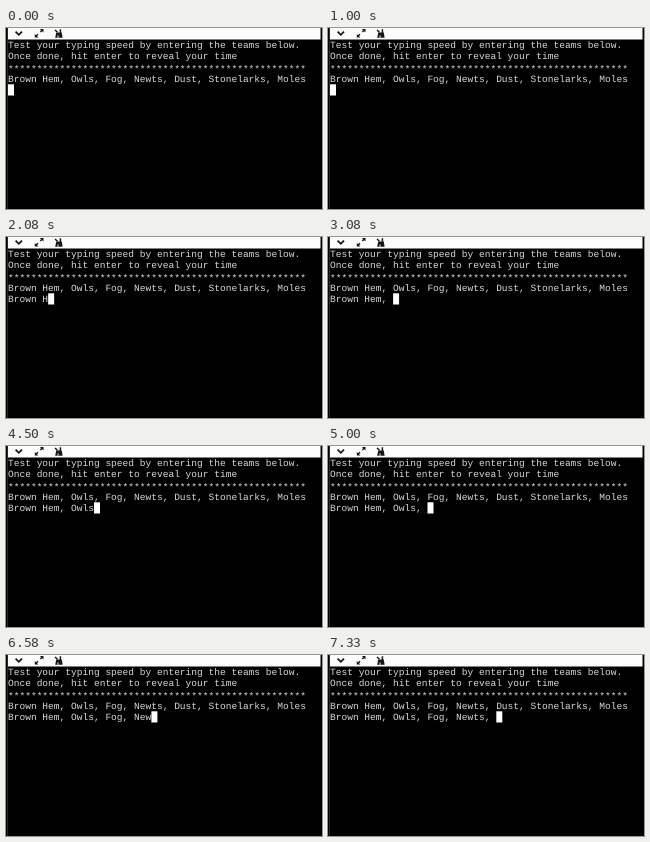
Write an HTML page that moves like this. It is 316 by 181 pixels and loops after 8000 ms.

```html
<!DOCTYPE html>
<html lang="en">
<head>
<meta charset="utf-8">
<title>Typing speed test</title>
<style>
  html, body { margin: 0; width: 100%; height: 100%; overflow: hidden; background: #000; }
  svg { display: block; width: 100%; height: 100%; }
  text {
    font: 9.557px "Liberation Mono", "Courier New", monospace;
    fill: #d8d8d8;
    white-space: pre;
    text-rendering: geometricPrecision;
  }
  .icon { fill: none; stroke: #161616; stroke-width: 1.8; }
  .solid { fill: #161616; stroke: none; }
</style>
</head>
<body>
<svg viewBox="0 0 316 181">
  <rect width="316" height="181" fill="#000"/>
  <rect x="1" width="1" height="181" fill="#1a2e38"/>
  <rect x="2" width="312.5" height="11.5" fill="#fbfdfc"/>
  <g class="icon">
    <path d="M9.6 3.6 12.8 6.8 16 3.6"/>
    <path d="M29.5 8.8 32 6.3M34.3 4 36.6 1.7" stroke-width="1.4"/>
    <path class="solid" d="M28.8 6v3.6h3.6zM33.9 1h3.6v3.6z"/>
    <path d="M49 2 51.5 4.2M54.4 1.2v4" stroke-width="1.5"/>
    <path class="solid" d="M50.2 4.4h5.6l.8 5.4h-7.4z"/>
    <path d="M52 7.4v2.4" stroke="#fbfdfc" stroke-width=".9"/>
  </g>
  <g id="lines"></g>
  <rect id="cursor" y="56.3" width="6" height="11.2" fill="#fff"/>
</svg>
<script>
const LOOP = 8000, LEFT = 2, CHAR = 5.735, TOP = 20, PITCH = 11.2;

// Each burst is typed at an even pace from its first key to its last
const bursts = [
  { text: "Brown H", from: 1170, to: 2080 },
  { text: "em", from: 2330, to: 2500 },
  { text: ", ", from: 3080, to: 3080 },
  { text: "O", from: 3500, to: 3500 },
  { text: "wls, ", from: 4000, to: 5000 },
  { text: "Fog", from: 5250, to: 5580 },
  { text: ", ", from: 6000, to: 6000 },
  { text: "New", from: 6250, to: 6580 },
  { text: "ts, ", from: 6920, to: 7330 }
];

const lines = document.getElementById("lines");
const cursor = document.getElementById("cursor");

function addLine(content, row) {
  const el = document.createElementNS("http://www.w3.org/2000/svg", "text");
  el.setAttribute("x", LEFT);
  el.setAttribute("y", TOP + row * PITCH);
  el.textContent = content;
  lines.append(el);
  return el;
}

addLine("Test your typing speed by entering the teams below.", 0);
addLine("Once done, hit enter to reveal your time", 1);
addLine("*".repeat(52), 2.1);
addLine("Brown Hem, Owls, Fog, Newts, Dust, Stonelarks, Moles", 3);
const typed = addLine("", 4);

function typedPart({ text, from, to }, t) {
  if (t < from) return "";
  if (t >= to) return text;
  const pace = (to - from) / (text.length - 1);
  return text.slice(0, 1 + Math.floor((t - from) / pace));
}

function draw(now) {
  const t = now % LOOP;
  const entry = bursts.map(b => typedPart(b, t)).join("");
  typed.textContent = entry;
  cursor.setAttribute("x", LEFT + entry.length * CHAR);
}

const start = performance.now();
function frame() {
  draw(performance.now() - start);
  requestAnimationFrame(frame);
}
frame();
</script>
</body>
</html>
```
